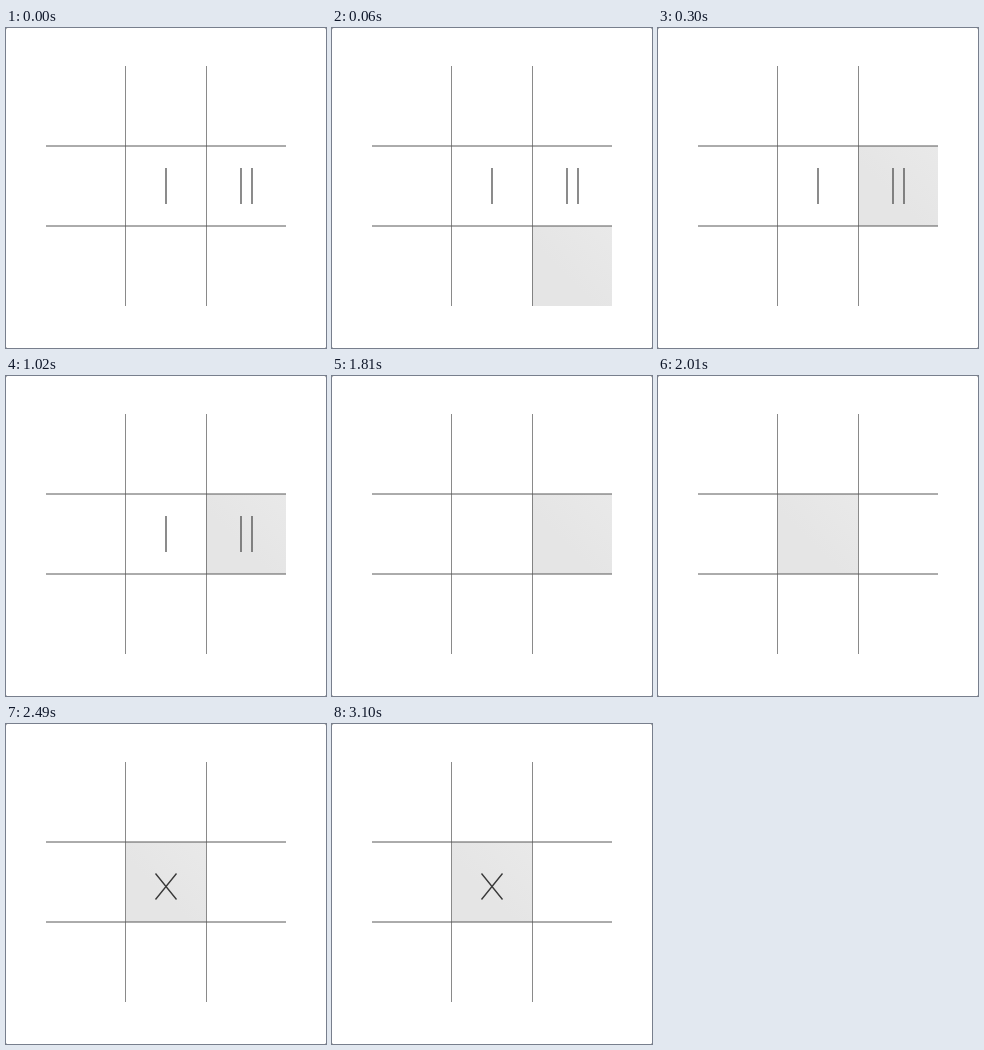
Animation, 320 px wide and 320 px high, one loop 3510 ms. Source, as an HTML page:

```html
<!DOCTYPE html>
<html lang="en">
<head>
<meta charset="utf-8">
<title>Grid</title>
<style>
  html, body {
    margin: 0;
    width: 100%;
    height: 100%;
    overflow: hidden;
    background: #777;
  }
  svg {
    display: block;
    width: 100vw;
    height: 100vh;
  }
  .cell, .bars, .cross {
    animation: 3510ms step-end infinite;
  }
  .cell { fill: url(#shade); animation-name: cell; }
  .rows, .cols { stroke: #585858; }
  .cols { stroke-width: .7; }
  .bars { stroke: #383838; stroke-width: 1.15; animation-name: bars; }
  .cross { stroke: #383838; stroke-width: 1.35; animation-name: cross; }

  @keyframes cell {
    0% { opacity: 0; transform: translate(200px, 198px); }
    1.709% { opacity: 1; transform: translate(200px, 198px); }
    8.547% { opacity: 1; transform: translate(200px, 118px); }
    57.264%, 100% { opacity: 1; transform: translate(120px, 118px); }
  }
  @keyframes bars {
    0% { opacity: 1; }
    42.735%, 100% { opacity: 0; }
  }
  @keyframes cross {
    0% { opacity: 0; }
    70.94%, 100% { opacity: 1; }
  }
</style>
</head>
<body>
<svg viewBox="0 0 320 320" fill="none">
  <linearGradient id="shade" x1="0" y1="1" x2="1" y2="0">
    <stop offset=".4" stop-color="#e5e5e5"/>
    <stop offset="1" stop-color="#e9e9e9"/>
  </linearGradient>
  <rect width="320" height="320" rx="1.5" fill="#fff"/>
  <rect class="cell" width="80" height="80"/>
  <path class="rows" d="M40 118H280M40 198H280"/>
  <path class="cols" d="M119.5 38V278M200.5 38V278"/>
  <path class="bars" d="M160 140V176M235 140V176M246 140V176"/>
  <path class="cross" d="M149.5 149.5L170.5 175.5M170.5 149.5L149.5 175.5"/>
</svg>
</body>
</html>
```
